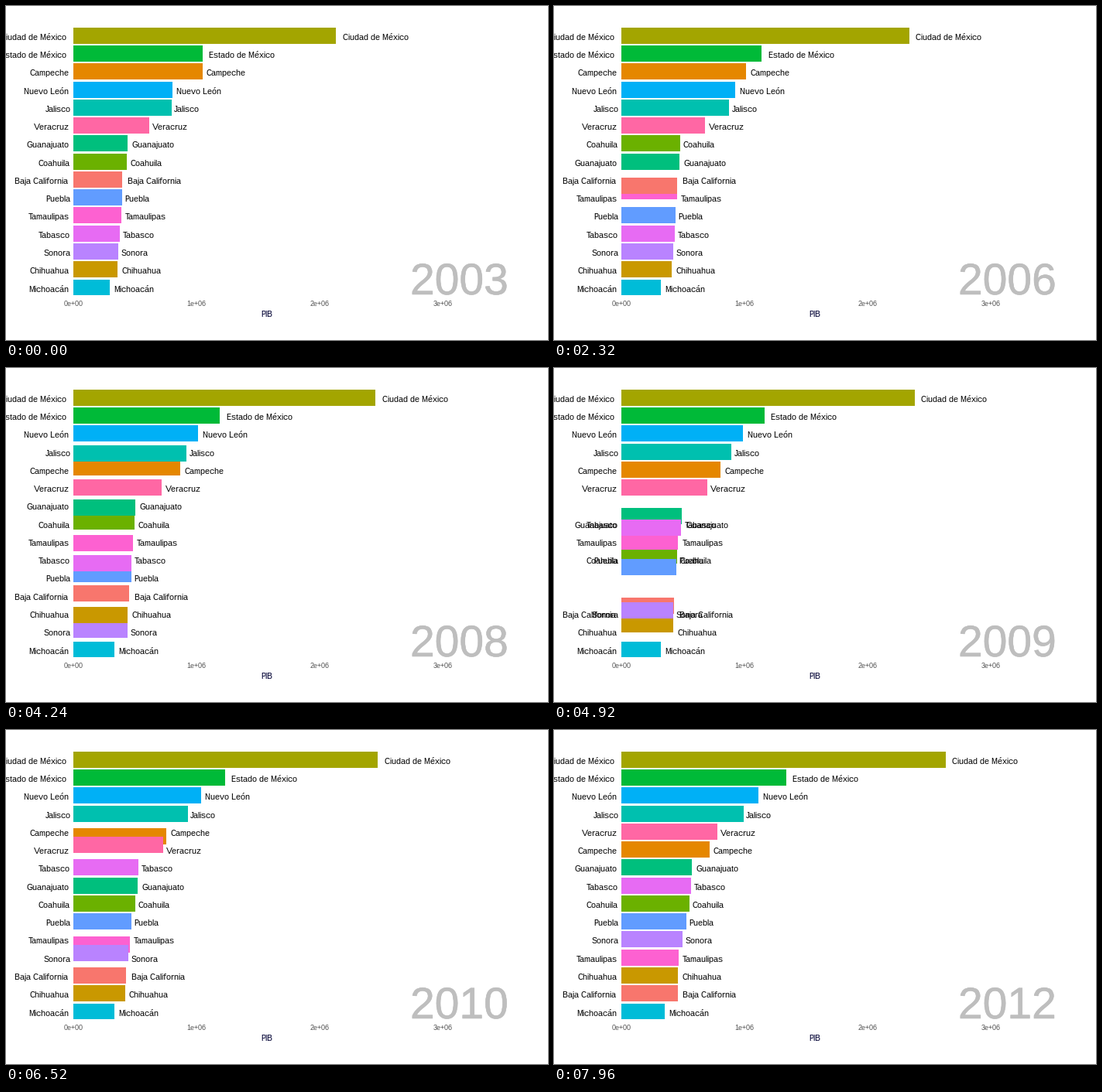
Animation, 700 px wide and 432 px high, one loop 8 s. Source, as a matplotlib script:

```python
import matplotlib.pyplot as plt
import numpy as np
from matplotlib.animation import FuncAnimation
from matplotlib.patches import Rectangle
from matplotlib.patheffects import withStroke

plt.rcParams.update({
    "font.family": "Liberation Sans",
    "text.hinting": "native",
    "text.hinting_factor": 1,
})

W, H, DPI = 700, 432, 100
FRAMES, STEP_MS = 200, 40
FIRST_YEAR = 2003
YEAR_FRAMES = 22               # frames spent on each year
X0, UNIT = 86.7, 159           # zero line, pixels per 1e+06
TOP, ROW = 27.81, 23.265       # top of the first bar, row pitch
BAR_H = 0.9 * ROW
BASELINE = 16                  # from the top of a bar to its text baseline

# National growth per year in percent; every state follows it.
GROWTH = [3.9, 2.3, 4.5, 2.3, 1.1, -5.3, 5.1, 3.7, 3.6]

# Bar length before growth, at the turning points {years since 2003: pixels}.
STATES = {
    "Baja California": {0: 63.7, 3: 66.4, 4: 66, 6: 59.8, 9: 59.3},
    "Campeche": {0: 167, 2: 156, 5: 119.5, 9: 92.8},
    "Chihuahua": {0: 57.7, 5: 61.6, 7: 57.6, 9: 59.6},
    "Ciudad de México": {0: 339.4, 9: 341},
    "Coahuila": {0: 69.4, 5: 69.4, 6: 61, 7: 69, 9: 71.7},
    "Estado de México": {0: 167.2, 5: 165, 9: 173.4},
    "Guanajuato": {0: 70.2, 3: 68.2, 9: 74.2},
    "Jalisco": {0: 127, 9: 128.6},
    "Michoacán": {0: 47, 9: 45.6},
    "Nuevo León": {0: 128, 5: 141, 9: 144.3},
    "Puebla": {0: 63, 3: 64.4, 4: 67.2, 6: 63.2, 9: 68.4},
    "Sonora": {0: 58.4, 4: 62.4, 6: 60.2, 9: 64.3},
    "Tabasco": {0: 60, 5: 65.8, 6: 72.8, 9: 73.6},
    "Tamaulipas": {0: 62, 2: 65.6, 5: 67, 9: 60.3},
    "Veracruz": {0: 98, 9: 101},
}

index = np.cumprod([1] + [1 + g / 100 for g in GROWTH])
LAST = len(GROWTH)
values = np.array([np.interp(range(LAST + 1), list(p), list(p.values())) * index
                   for p in STATES.values()])
ranks = (-values).argsort(axis=0).argsort(axis=0)


def hcl(hue, chroma=100, lum=65):
    """Polar LUV colour as sRGB."""
    h = np.radians(hue)
    y = ((lum + 16) / 116) ** 3
    u = chroma * np.cos(h) / (13 * lum) + 0.19784
    v = chroma * np.sin(h) / (13 * lum) + 0.46834
    x = 9 * y * u / (4 * v)
    z = 3 * y / v - 5 * y - x / 3
    rgb = np.clip([3.2405 * x - 1.5372 * y - 0.4985 * z,
                   -0.9693 * x + 1.8760 * y + 0.0416 * z,
                   0.0556 * x - 0.2040 * y + 1.0573 * z], 0, 1)
    return np.where(rgb <= 0.0031308, 12.92 * rgb,
                    1.055 * rgb ** (1 / 2.4) - 0.055)


fig = plt.figure(figsize=(W / DPI, H / DPI), dpi=DPI, facecolor="white")
ax = fig.add_axes([0, 0, 1, 1])
ax.set_xlim(0, W)
ax.set_ylim(H, 0)
ax.axis("off")


def put(x, y, s, size, color="black", ha="center", z=5):
    return ax.text(x, y, s, fontsize=size * 72 / DPI, color=color,
                   ha=ha, va="baseline", zorder=z)


for k in range(4):
    put(X0 + k * UNIT, 388, f"{k}e+{'06' if k else '00'}", 9, "#4D4D4D")
put(336.5, 402, "PIB", 11, "#000033")
year_text = put(586, 373, str(FIRST_YEAR), 57, "#BEBEBE", z=4)
year_text.set_path_effects([withStroke(linewidth=0.4, foreground="#BEBEBE")])

bars, names, labels, pads = [], [], [], []
renderer = fig.canvas.get_renderer()
for i, name in enumerate(STATES):
    bar = Rectangle((X0, 0), 1, BAR_H, linewidth=0, antialiased=False,
                    facecolor=hcl(15 + 360 * i / len(STATES)))
    bars.append(ax.add_patch(bar))
    label = put(0, 0, name, 11, ha="left")
    pad = 0.1 * label.get_window_extent(renderer).width
    labels.append(label)
    pads.append(pad)
    names.append(put(X0 - pad, 0, name, 11, ha="right"))


def ease(t):
    return 2 * t * t if t < 0.5 else 1 - 2 * (1 - t) ** 2


def draw(frame):
    phase = max(frame - 1, 0) / YEAR_FRAMES
    a = min(int(phase), LAST)
    b = min(a + 1, LAST)
    e = ease(phase - a)
    length = values[:, a] + (values[:, b] - values[:, a]) * e
    rank = ranks[:, a] + (ranks[:, b] - ranks[:, a]) * e
    # text jumps between whole rows while the bars glide
    text_y = np.round(TOP + ROW * np.round(rank)) + BASELINE

    for i, bar in enumerate(bars):
        bar.set_y(TOP + ROW * rank[i])
        bar.set_width(length[i])
        bar.set_zorder(2 + ranks[i, a] / 100)   # climbing bars pass in front
        names[i].set_y(text_y[i])
        labels[i].set_position((X0 + length[i] + pads[i], text_y[i]))
    year_text.set_text(str(FIRST_YEAR + int(phase + 0.5)))
    return [*bars, *names, *labels, year_text]


anim = FuncAnimation(fig, draw, frames=FRAMES, interval=STEP_MS,
                     repeat=True, repeat_delay=0, blit=False)
plt.show()
```
